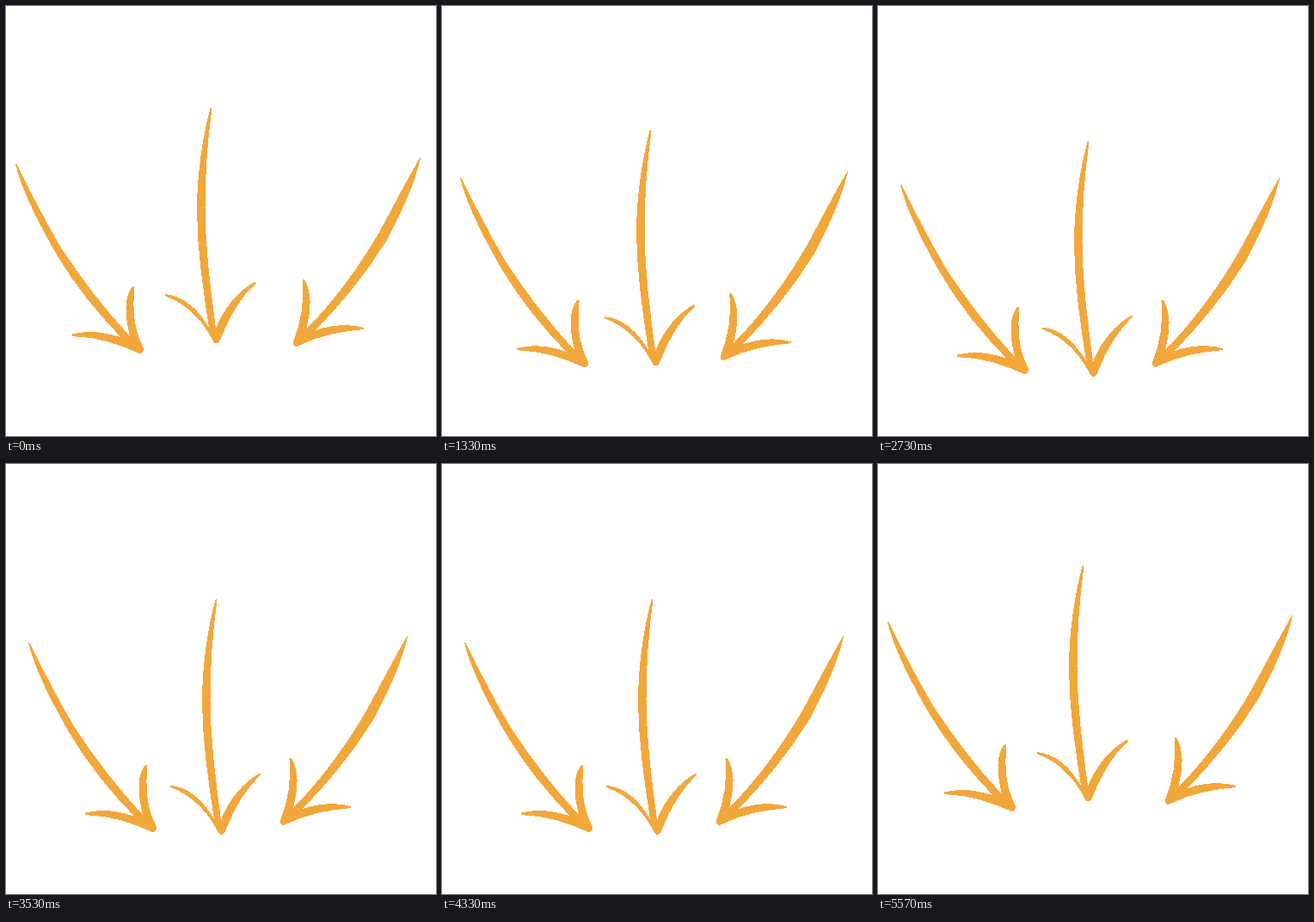
These frames come from a looping animation (500 px wide and 500 px high, 5610 ms). An HTML page:

```html
<!DOCTYPE html>
<html lang="en">
<head>
<meta charset="utf-8">
<title>Three arrows</title>
<style>
  html, body { margin: 0; width: 100%; height: 100%; overflow: hidden; background: #fff; }
  svg { display: block; width: 100%; height: 100%; }
</style>
</head>
<body>
<svg viewBox="0 0 500 500" fill="#f2a73b" shape-rendering="crispEdges">
  <path id="left" d="M12 183C29 217 45 249 64 281C88 318 115 353 144 384
    C138 360 137 338 147 326L149.5 326C147.5 350 147 372 160 398C161 403 156 405 153 403
    C130 393 108 385 77 384L77.5 381.5C95 377 115 379 134 385.5
    C106 357 78 322 57 286C38 252 19 216 11 184Z"/>
  <path id="middle" d="M239.5 119C234 158 231.5 197 231.5 235C231.5 280 238 330 244 375
    C253 352 270 331 289 321L290.5 322.5C274 337 260 360 249 388C248 393 242 393 241 390
    C231 370 213 347 185 337L185.5 335C206 337 223 352 236 374
    C229 330 222 280 222 237C222 195 229 150 237.5 119L238.7 118Z"/>
  <path id="right" d="M482 177C476 204 461 238 443 272C419 311 390 346 360 377
    C378 371 398 369 416 374L416.5 376C390 378 365 383 340 395C337 397 333 395 334 391
    C343 367 347 344 344.5 319L346.5 317.5C356 333 355 352 349 376
    C381 344 412 301 434 263C451 232 465 204 481.5 176Z"/>
</svg>
<script>
  const LOOP = 5610;
  const POSES = 20;
  const LOWEST = 9;
  const travel = { left: [16.9, 27], middle: [6.75, 43.6], right: [-16.9, 27] };
  const arrows = Object.entries(travel).map(([id, shift]) => [document.getElementById(id), shift]);

  // 25 poses per second, shown on a 30 Hz clock rounded to 10 ms.
  function poseAt(ms) {
    const tick = Math.floor((Math.floor(ms / 10) + 0.4) * 0.3);
    return Math.floor(tick * 5 / 6) % POSES;
  }

  function draw(ms) {
    const pose = poseAt(ms % LOOP);
    const k = pose <= LOWEST ? pose / LOWEST : (POSES - 1 - pose) / (POSES - 1 - LOWEST);
    for (const [arrow, [dx, dy]] of arrows) {
      arrow.setAttribute("transform", `translate(${dx * k} ${dy * k})`);
    }
  }

  const start = performance.now();
  function tick() {
    draw(performance.now() - start);
    requestAnimationFrame(tick);
  }
  tick();
</script>
</body>
</html>
```
